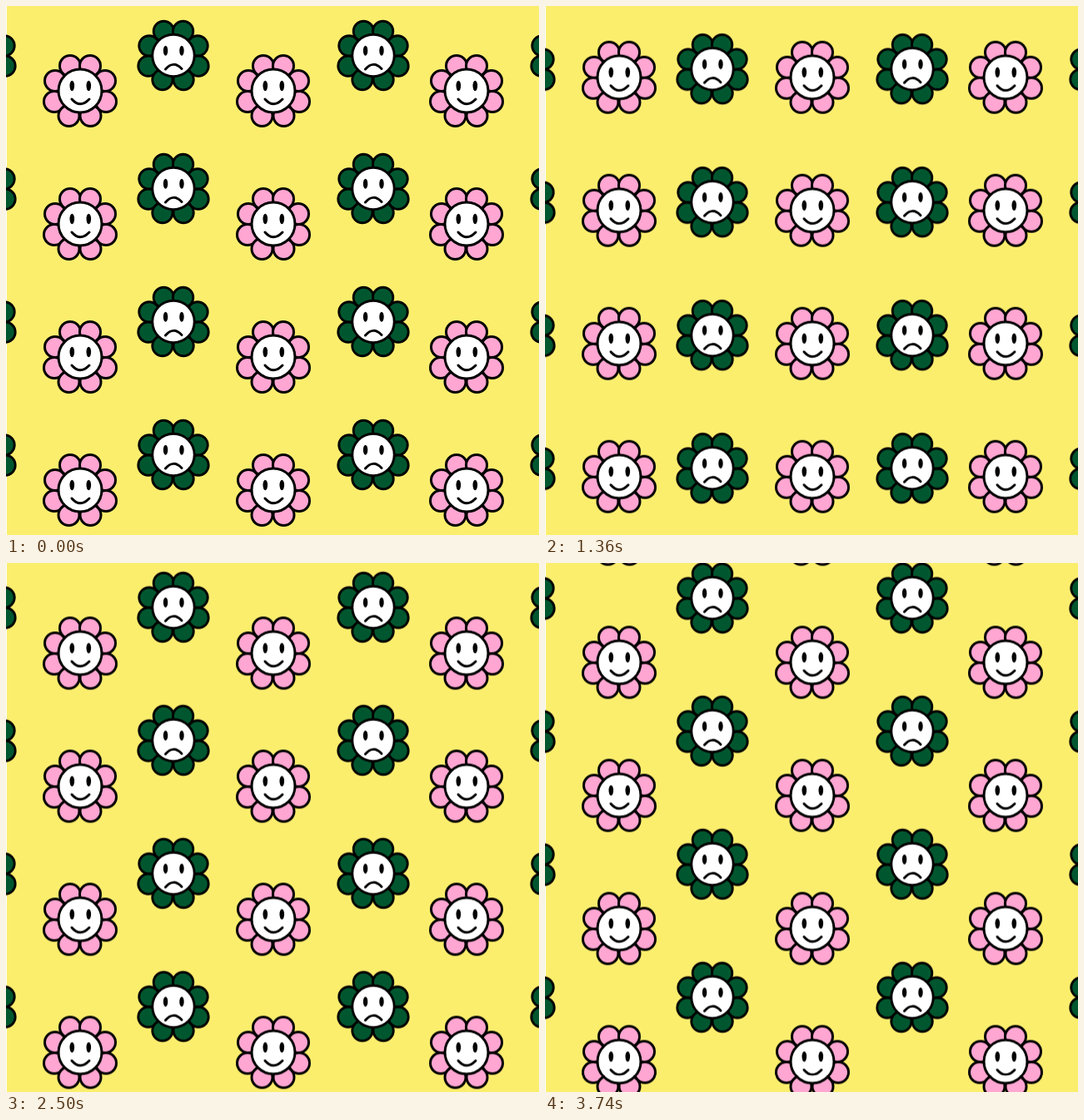
Write an HTML page that moves like this. It is 640 px wide and 636 px high and loops after 3800 ms.

```html
<!DOCTYPE html>
<html lang="en">
<head>
<meta charset="utf-8">
<title>Happy and sad flowers</title>
<style>
  html, body { margin: 0; width: 100%; height: 100%; overflow: hidden; background: #fcee6d; }
  svg { display: block; width: 640px; height: 636px; }
  .flower { stroke: #000; stroke-width: 3; stroke-linecap: round; }
  .core { fill: #fff; }
  .eye { fill: #000; stroke: none; }
  .mouth { fill: none; }
  #happy { fill: #ffa6d2; }
  #sad { fill: #00572f; }

  .drift { animation: drift 3800ms -2ms infinite; }
  .up { --dir: -1px; }
  .down { --dir: 1px; }

  /* Steps of 60, 70, 80, 90, 80 and 70 ms, then a hard restart */
  @keyframes drift {
    0%       { transform: translateY(0); animation-timing-function: steps(8); }
    12.6315% { transform: translateY(calc(66.5 * var(--dir))); animation-timing-function: steps(8); }
    27.3684% { transform: translateY(calc(137.4 * var(--dir))); animation-timing-function: steps(16); }
    61.0526% { transform: translateY(calc(292.8 * var(--dir))); animation-timing-function: steps(8); }
    80%      { transform: translateY(calc(376.2 * var(--dir))); animation-timing-function: steps(7); }
    94.7368% { transform: translateY(calc(444.8 * var(--dir))); animation-timing-function: steps(2); }
    98.421%, 100% { transform: translateY(calc(462.6 * var(--dir))); }
  }
</style>
</head>
<body>
<svg viewBox="0 0 640 636">
  <defs>
    <g id="petals">
      <circle cx="-30" cy="-12" r="12.5"/>
      <circle cx="30" cy="-12" r="12.5"/>
      <circle cx="-31" cy="13" r="12.5"/>
      <circle cx="31" cy="13" r="12.5"/>
      <circle cx="-12" cy="-30" r="12.5"/>
      <circle cx="12" cy="-30" r="12.5"/>
      <circle cx="-13.5" cy="30" r="12.5"/>
      <circle cx="12.5" cy="30" r="12.5"/>
      <circle class="core" r="26"/>
      <ellipse class="eye" cx="-9.7" cy="-6" rx="2.8" ry="6.2"/>
      <ellipse class="eye" cx="10.3" cy="-6" rx="2.8" ry="6.2"/>
    </g>
    <g id="happy" class="flower">
      <use href="#petals"/>
      <path class="mouth" d="M-10 10Q0 21.5 11 10"/>
    </g>
    <g id="sad" class="flower">
      <use href="#petals" transform="scale(.97)"/>
      <path class="mouth" d="M-9.5 16.5Q0 5.5 10 16"/>
    </g>
    <g id="happyRow">
      <use href="#happy" x="89"/>
      <use href="#happy" x="321"/>
      <use href="#happy" x="553"/>
    </g>
    <g id="sadRow">
      <use href="#sad" x="-31"/>
      <use href="#sad" x="201"/>
      <use href="#sad" x="441"/>
      <use href="#sad" x="673"/>
    </g>
  </defs>

  <rect width="640" height="636" fill="#fcee6d"/>
  <rect width="1" height="636" fill="#fff"/>

  <g class="drift up">
    <use href="#happyRow" y="102"/>
    <use href="#happyRow" y="262"/>
    <use href="#happyRow" y="422"/>
    <use href="#happyRow" y="582"/>
    <use href="#happyRow" y="742"/>
    <use href="#happyRow" y="902"/>
    <use href="#happyRow" y="1062"/>
  </g>
  <g class="drift down">
    <use href="#sadRow" y="-420.5"/>
    <use href="#sadRow" y="-260.5"/>
    <use href="#sadRow" y="-100.5"/>
    <use href="#sadRow" y="59.5"/>
    <use href="#sadRow" y="219.5"/>
    <use href="#sadRow" y="379.5"/>
    <use href="#sadRow" y="539.5"/>
  </g>
</svg>
</body>
</html>
```
